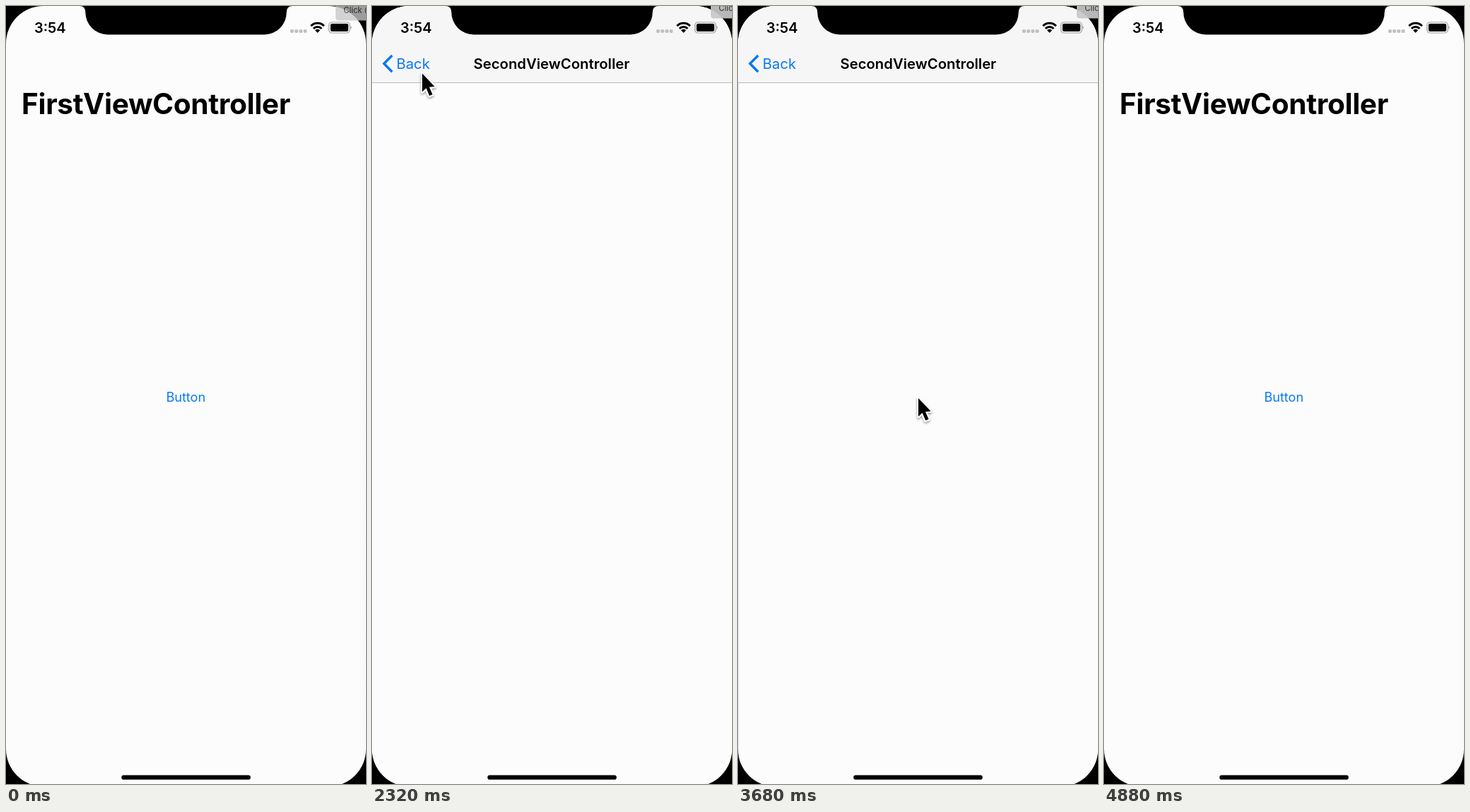
Write an HTML page that moves like this. It is 509 by 1101 pixels and loops after 5520 ms.

```html
<!DOCTYPE html>
<html lang="en">
<head>
<meta charset="utf-8">
<title>Navigation push and pop</title>
<style>
  html, body { margin: 0; width: 100%; height: 100%; overflow: hidden; background: #000; }
  svg { display: block; width: 509px; height: 1101px; }
  text { font-family: Inter, Roboto, sans-serif; font-optical-sizing: none; white-space: pre; }
  .link { fill: #0878f5; }
  #large { font-size: 40.5px; font-weight: 700; letter-spacing: -.3px; }
  #title { font-size: 20.3px; font-weight: 600; }
  #back { font-size: 20.3px; }
  #button { font-size: 18px; text-anchor: middle; }
  #clock { font-size: 20px; font-weight: 600; }
  #tip text { font-size: 11.2px; fill: #333; }
</style>
</head>
<body>
<svg viewBox="0 0 509 1101">
  <defs>
    <linearGradient id="edge">
      <stop offset="0" stop-opacity="0"/>
      <stop offset="1" stop-opacity=".015"/>
    </linearGradient>
    <clipPath id="screen"><rect width="509" height="1104.5" rx="53"/></clipPath>
    <filter id="drop" x="-50%" y="-30%" width="200%" height="170%">
      <feDropShadow dx="0" dy="2" stdDeviation="1.6" flood-opacity=".4"/>
    </filter>
  </defs>

  <rect width="509" height="1101"/>
  <g clip-path="url(#screen)">
    <rect width="509" height="1101" fill="#fcfcfc"/>
    <text id="button" class="link" x="254.3" y="559.5">Button</text>
    <rect id="dim" width="509" height="1101"/>
    <g id="panel">
      <rect x="-12" width="12" height="1101" fill="url(#edge)"/>
      <rect width="509" height="1101" fill="#fcfcfc"/>
    </g>
    <g id="bar">
      <rect width="509" height="108.5" fill="#f6f6f6"/>
      <rect y="108" width="509" height="1" fill="#b9b9b9"/>
    </g>
    <text id="large" x="22" y="153.3">FirstViewController</text>
    <g id="backItem">
      <path d="M28.5 70 17 81.6 28.5 93.2" fill="none" stroke="#0878f5" stroke-width="3.5"/>
      <text id="back" class="link" y="89">Back</text>
    </g>
    <text id="title" y="89">SecondViewController</text>

    <text id="clock" x="40" y="38">3:54</text>
    <g id="dots" fill="#bfbfbf"></g>
    <g fill="none" stroke="#000" stroke-width="3">
      <path d="M431.2 28.2A13.2 13.2 0 0 1 449.8 28.2"/>
      <path d="M434.7 32A8.2 8.2 0 0 1 446.3 32"/>
    </g>
    <path d="M440.5 38 436.9 34.3A5 5 0 0 1 444.1 34.3Z"/>
    <rect x="456.7" y="23" width="29.4" height="15" rx="4" fill="none" stroke="#999" stroke-width="1.2"/>
    <rect x="458.8" y="25.1" width="25.2" height="10.8" rx="2.2"/>
    <path d="M487.4 28Q490 30.5 487.4 33Z" fill="#999"/>

    <path d="M104 0Q112.3 0 112.3 9A31.5 31.5 0 0 0 143.8 40.5H365.2A31.5 31.5 0 0 0 396.7 9Q396.7 0 405 0Z"/>
    <rect x="163.3" y="1088.6" width="182.5" height="6.2" rx="3.1"/>
  </g>

  <g id="cursor" filter="url(#drop)">
    <path d="M0 0V26L5.6 20.8 10.2 31.6 14.6 29.7 10 19.2 17.6 18.6Z"
          stroke="#fff" stroke-width="4" paint-order="stroke" stroke-linejoin="round"/>
  </g>
  <g id="tip">
    <path d="M0 -10H60V20.5H4Q0 20.5 0 16.5Z" fill="#c8c8c8" fill-opacity=".92"/>
    <text x="11.3" y="10">Click (</text>
  </g>
</svg>

<script>
const LOOP = 5520, STEP = 80, WIDTH = 509;

// time, x, y of the pointer tip
const pointerPath = [
  [160, 45, 1088], [880, 268, 568], [1760, 268, 568], [2080, 70, 95],
  [2240, 70, 95], [2320, 71, 95.5], [3000, 71, 95.5], [3240, 255, 555],
  [3760, 255, 555], [4160, 63, 98], [4400, 63, 98], [4560, -30, 50]
];
const tipPath = [[160, 466, 0], [640, 479, -3], [3920, 479, -3], [4160, 512, -3]];
// start time and destination of each view transition
const transitions = [[1095.5, 1], [2548, 0], [3347, 1], [4410, 0]];

const $ = id => document.getElementById(id);
const mix = (a, b, k) => a + (b - a) * k;
const clamp = k => Math.min(1, Math.max(0, k));
const ease = k => k * k * (3 - 2 * k);
const within = (t, a, b) => t >= a && t < b;
const move = (id, x, y = 0) => $(id).setAttribute('transform', `translate(${x} ${y})`);
const fade = (id, k) => $(id).setAttribute('opacity', k);

for (let i = 0; i < 4; i++) {
  $('dots').innerHTML += `<rect x="${402 + i * 6.2}" y="33.2" width="4.8" height="4.8" rx="1.4"/>`;
}

function along(path, t) {
  const next = path.findIndex(point => point[0] > t);
  if (next < 0) return path[path.length - 1].slice(1);
  if (next === 0) return path[0].slice(1);
  const [t0, x0, y0] = path[next - 1], [t1, x1, y1] = path[next];
  const k = ease((t - t0) / (t1 - t0));
  return [mix(x0, x1, k), mix(y0, y1, k)];
}

// critically damped spring
function spring(ms) {
  const k = ms * 0.025;
  return k > 10 ? 1 : 1 - (1 + k) * Math.exp(-k);
}

function pushAmount(t) {
  const last = transitions.filter(([start]) => start <= t).pop();
  if (!last) return 0;
  const s = spring(t - last[0]);
  return last[1] ? s : 1 - s;
}

function draw(t) {
  const p = pushAmount(t);
  const q = Math.pow(p, 1.16);
  const buttonDown = within(t, 1040, 1600) || within(t, 3280, 3840);
  const backDown = within(t, 2480, 3040) || within(t, 4320, 4960);

  move('button', -0.3 * WIDTH * p);
  fade('button', buttonDown ? 0.3 : 1);
  fade('dim', 0.1 * Math.pow(p, 1.5));
  move('panel', WIDTH * (1 - p));
  fade('bar', p);
  fade('large', 1 - clamp((p - 0.13) / 0.5));
  fade('backItem', p * (backDown ? 0.3 : 1));
  $('back').setAttribute('x', mix(158.5, 34.4, q));
  fade('title', p);
  $('title').setAttribute('x', mix(495.5, 143.6, q));

  move('cursor', ...along(pointerPath, t));
  fade('cursor', +within(t, 160, 4640));
  move('tip', ...along(tipPath, t));
  fade('tip', t < 160 ? 0.85 : +(t < 4160));
}

function tick(now) {
  draw(Math.floor((now % LOOP) / STEP) * STEP);
  requestAnimationFrame(tick);
}
draw(0);
requestAnimationFrame(tick);
</script>
</body>
</html>
```
